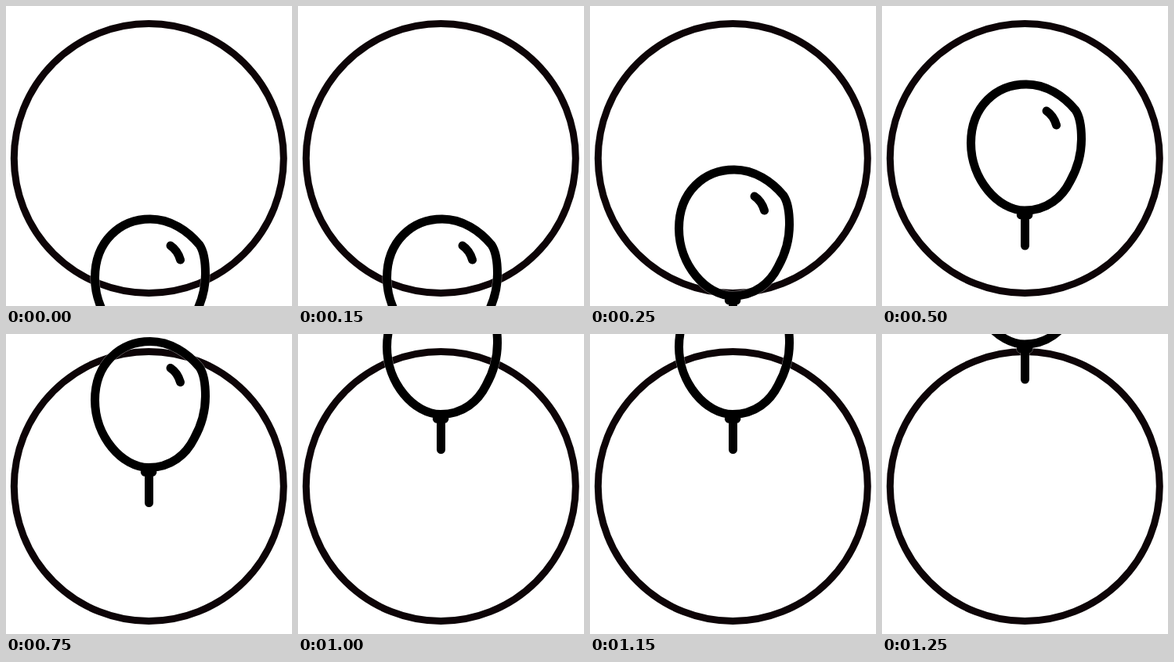
Recreate the animation shown at these times as an HTML page. Size 365x383 px, loop 1.5 s.

```html
<!DOCTYPE html>
<html lang="en">
<head>
<meta charset="utf-8">
<title>Rising balloon</title>
<style>
  html, body { margin: 0; width: 100%; height: 100%; overflow: hidden; background: #fff; }
  svg { display: block; }
  path, circle { fill: none; }
  path { stroke-linecap: round; stroke-linejoin: round; }
</style>
</head>
<body>
<svg width="365" height="383" viewBox="0 0 365 383">
  <defs>
    <g id="shape">
      <path d="M184 100C210 100 232 115 247 133C253 142 254.5 157 254.5 170C254.5 190 249 208 240 224C230 244 211 261 182 261C148 261 113.5 221 113.5 175C113.5 128 146 100 184 100Z"/>
      <path d="M210 134Q219 140 222.5 152"/>
      <path d="M177.3 266.8H186.9M182.5 266V306"/>
    </g>
  </defs>
  <circle cx="182.3" cy="194.5" r="172" stroke="#0d0407" stroke-width="9"/>
  <g id="balloon">
    <!-- faint light edge where the balloon crosses the ring -->
    <use href="#shape" stroke="#fff" stroke-opacity=".5" stroke-width="12"/>
    <use href="#shape" stroke="#000" stroke-width="11"/>
  </g>
</svg>
<script>
  const balloon = document.getElementById('balloon');
  const heights = [172, 109, 0, -90.5, -158.5, -248];
  const HOLD = 250;
  const start = performance.now();

  function draw(now) {
    const step = Math.floor(Math.max(0, now - start) / HOLD) % heights.length;
    balloon.setAttribute('transform', `translate(0 ${heights[step]})`);
    requestAnimationFrame(draw);
  }
  draw(start);
</script>
</body>
</html>
```
